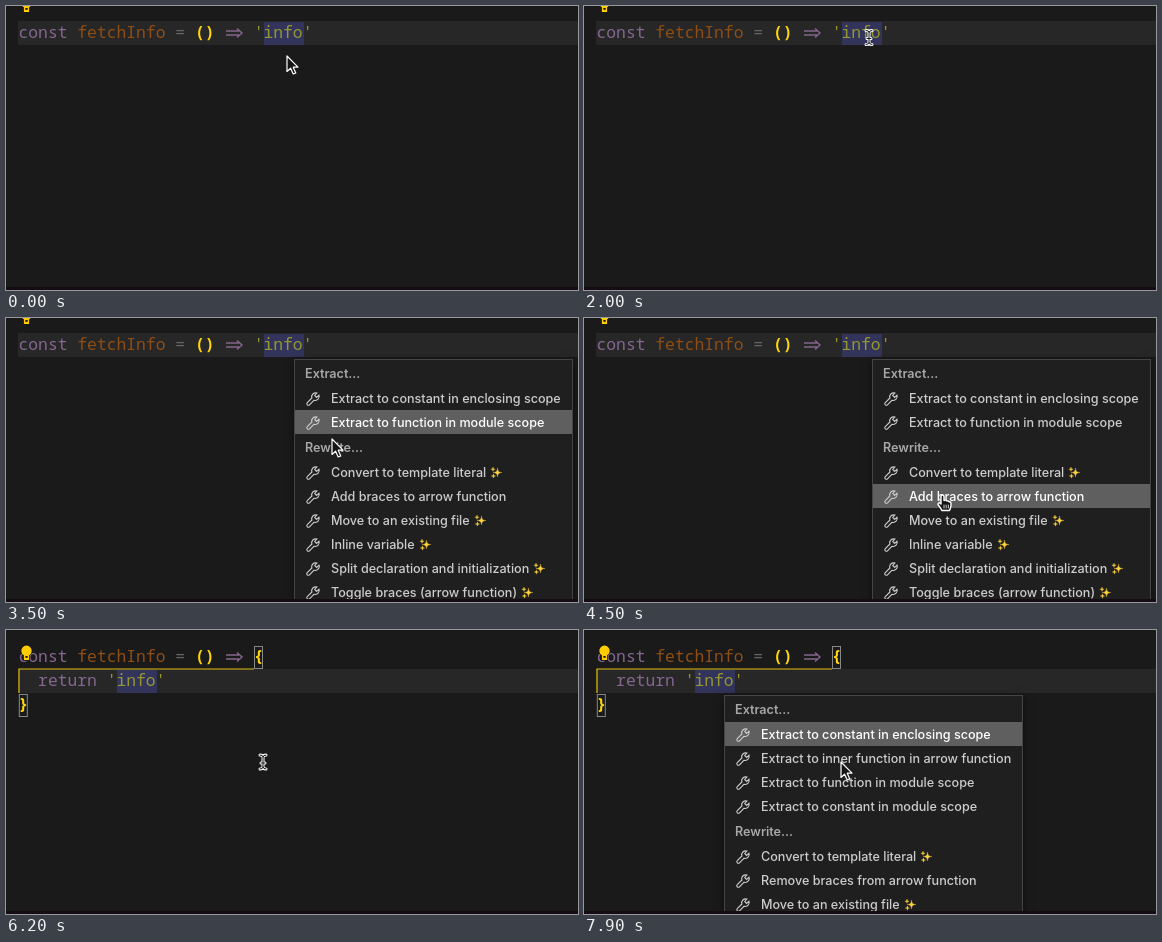
Recreate the animation shown at these times as an HTML page. Size 572 by 284 pixels, loop 8000 ms.

```html
<!DOCTYPE html>
<html lang="en">
<head>
<meta charset="utf-8">
<title>Refactor menu</title>
<style>
  html, body { margin: 0; width: 100%; height: 100%; overflow: hidden; background: #1a1a1a; }
  #stage { position: relative; width: 572px; height: 284px; overflow: hidden; }
  #stage > svg { position: absolute; left: 0; top: 0; }
  text { font: 500 16.33px "Noto Sans Mono", "DejaVu Sans Mono", monospace; white-space: pre; }
  .menu {
    position: absolute; box-sizing: border-box; height: 300px;
    background: #1f1f1f; border: 1px solid #454545;
    box-shadow: 0 2px 8px #0008; color: #ccc;
    font: 500 12.6px Inter, "Open Sans", sans-serif; white-space: nowrap;
  }
  .head { height: 26px; line-height: 27px; padding-left: 10px; font-weight: 600; color: #a8a8a8; }
  .item { height: 24px; line-height: 26px; padding-left: 36px; position: relative; }
  .item.on { background: #5f5f5f; color: #fff; }
  .wrench { position: absolute; left: 10px; top: 5px; }
  .spark { margin-left: 4px; vertical-align: -2px; }
</style>
</head>
<body>
<div id="stage">
  <svg id="code" width="572" height="284"></svg>
  <div id="menus"></div>
  <svg width="572" height="284">
    <rect y="281" width="572" height="3" fill="#150d13"/>
    <g id="cursor" stroke-linejoin="round" stroke-linecap="round">
      <path id="arrow" d="M0 0V15.5L3.6 12.2 6.2 18 8.8 16.9 6.2 11.2H11Z" fill="#151515" stroke="#fff" stroke-width="1.2"/>
      <g id="beam" fill="none">
        <g stroke="#fff" stroke-width="3">
          <path id="bar" d="M-3-7Q0-7 0-5V5Q0 7-3 7M3-7Q0-7 0-5M0 5Q0 7 3 7M-2 1H2"/>
        </g>
        <use href="#bar" stroke="#151515" stroke-width="1"/>
      </g>
      <g id="hand" transform="translate(-1 0)" stroke="#fff">
        <path d="M-2 1Q-2-.5-.5-.5T1 1V5Q3 4 3.8 5.5 5.5 5 6 6.3 8 6 8 8V10Q7.5 13 6.5 15H-1Q-3 11.5-5 9-5 7-3.5 7.2L-2 8.5Z" fill="#151515" stroke-width="1.4"/>
        <path d="M1 9.5V12.5M3.2 9.5V12.5M5.4 9.5V12.5" stroke-width=".8"/>
      </g>
    </g>
  </svg>
</div>
<script>
const $ = id => document.getElementById(id);
const show = (id, on) => { $(id).style.display = on ? '' : 'none'; };

// Code editor
const COL = 9.8, LEFT = 12.5, ROW = 24, TOP = 15;
const PURPLE = '#85678f', BROWN = '#8f4f14', GREY = '#67626c', GOLD = '#ffd70f', OLIVE = '#95982f';
const colX = c => LEFT + c * COL;
const put = (row, col, str, color, weight = 500) =>
  `<text x="${colX(col)}" y="${TOP + row * ROW + 17}" fill="${color}" style="font-weight:${weight}">${str}</text>`;
const lineBack = row => `<rect x="12" y="${TOP + row * ROW}" width="560" height="24" fill="#272727"/>`;
const literal = (row, col) =>
  `<rect x="${Math.ceil(colX(col + 1))}" y="${TOP + row * ROW + 1}" width="40" height="23" fill="#32345c"/>` +
  put(row, col, "'info'", OLIVE);
const brace = (row, col, ch) =>
  `<rect x="${colX(col) + .8}" y="${TOP + row * ROW + 1.5}" width="8" height="22" fill="none" stroke="#888"/>` +
  put(row, col, ch, GOLD, 600);
const bulb = (id, y) => `<g id="${id}" transform="translate(20.5 ${y})">
  <path d="M-2.6 7.5V2.8A5.2 5.2 0 1 1 2.6 2.8V7.5Z" fill="#ffcc00" stroke="#1a1a1a" stroke-width="1.5" paint-order="stroke"/>
  <path d="M-1.2 4.4H1.2" stroke="#1a1a1a" stroke-width="1.8"/></g>`;
const firstLine = put(0, 0, 'const', PURPLE) + put(0, 6, 'fetchInfo', BROWN) +
  put(0, 16, '=', GREY) + put(0, 18, '()', GOLD, 600) +
  `<path d="M220 25H233M220 29H233M231 22.5L236 27 231 31.5" fill="none" stroke="${PURPLE}" stroke-width="1.4"/>`;

$('code').innerHTML = `
  <g id="before">${lineBack(0)}${literal(0, 24)}${firstLine}${bulb('bulb1', -1.5)}</g>
  <g id="after">${lineBack(1)}${firstLine}
    <path d="M248 39H13V63" fill="none" stroke="#e0bd0c" stroke-width="1.2"/>
    ${brace(0, 24, '{')}${put(1, 2, 'return', PURPLE)}${literal(1, 9)}${brace(2, 0, '}')}
    ${bulb('bulb2', 22.5)}</g>`;

// Menus: '#' marks a heading, '*' a sparkle
const wrench = `<svg class="wrench" width="16" height="16"><path d="M14 4.2 11.6 6.4 9.7 4.5 11.9 2.1A3.9 3.9 0 0 0 6.9 7L2.3 11.6a1.5 1.5 0 0 0 2.2 2.2L9.1 9.2A3.9 3.9 0 0 0 14 4.2Z" fill="none" stroke="#ccc" stroke-width="1.1"/></svg>`;
const star = (x, y, r) => `M${x} ${y - r}Q${x} ${y} ${x + r} ${y}Q${x} ${y} ${x} ${y + r}Q${x} ${y} ${x - r} ${y}Q${x} ${y} ${x} ${y - r}`;
const spark = `<svg class="spark" width="13" height="13"><path d="${star(7.5, 6.5, 4.5)}${star(3, 3.2, 2.2)}${star(3.4, 10, 2.2)}" fill="#ffd23e" stroke="#ffd23e" stroke-width=".3"/></svg>`;
const row = s => s[0] === '#'
  ? `<div class="head">${s.slice(1)}</div>`
  : `<div class="item">${wrench}${s.replace('*', spark)}</div>`;
const menu = (id, x, y, w, rows) =>
  `<div class="menu" id="${id}" style="left:${x}px;top:${y}px;width:${w}px">${rows.map(row).join('')}</div>`;

$('menus').innerHTML =
  menu('menu1', 288, 41, 279, ['#Extract...',
    'Extract to constant in enclosing scope', 'Extract to function in module scope', '#Rewrite...',
    'Convert to template literal*', 'Add braces to arrow function', 'Move to an existing file*',
    'Inline variable*', 'Split declaration and initialization*', 'Toggle braces (arrow function)*']) +
  menu('menu2', 140, 65, 299, ['#Extract...',
    'Extract to constant in enclosing scope', 'Extract to inner function in arrow function',
    'Extract to function in module scope', 'Extract to constant in module scope', '#Rewrite...',
    'Convert to template literal*', 'Remove braces from arrow function', 'Move to an existing file*']);
const items1 = [...$('menu1').querySelectorAll('.item')];
$('menu2').querySelector('.item').classList.add('on');

// Pointer path: time, x, y
const PATH = [[0, 281, 50], [200, 281, 50], [800, 285, 32], [3000, 285, 31], [3500, 326, 121],
  [3900, 360, 177], [5000, 360, 178], [5700, 257, 132], [8000, 257, 132]];
function pointer(t) {
  const i = PATH.findIndex(p => p[0] > t);
  const [a, b] = [PATH[i - 1], PATH[i]];
  const k = (t - a[0]) / (b[0] - a[0]);
  return [a[1] + (b[1] - a[1]) * k, a[2] + (b[2] - a[2]) * k];
}

function draw(time) {
  const t = Math.floor(time % 8000 / 100) * 100;
  const [x, y] = pointer(t);
  const open1 = t >= 2400 && t < 4600, open2 = t >= 7200, edited = t >= 4700;
  show('before', !edited);
  show('after', edited);
  show('bulb2', t >= 5300);
  show('menu1', open1);
  show('menu2', open2);

  const hover = y < 92 ? 0 : y < 142 ? 1 : y < 166 ? 2 : 3;
  items1.forEach((el, i) => el.classList.toggle('on', i === hover));

  const onItem = open1 && x > 288 && y > 68 && (y < 116 || y > 142);
  const arrow = t < 400 || open2 || (open1 && !onItem);
  show('hand', onItem);
  show('arrow', arrow);
  show('beam', !onItem && !arrow);
  $('cursor').setAttribute('transform', `translate(${x} ${y})`);
  requestAnimationFrame(() => draw(performance.now() - start));
}
const start = performance.now();
draw(0);
</script>
</body>
</html>
```
